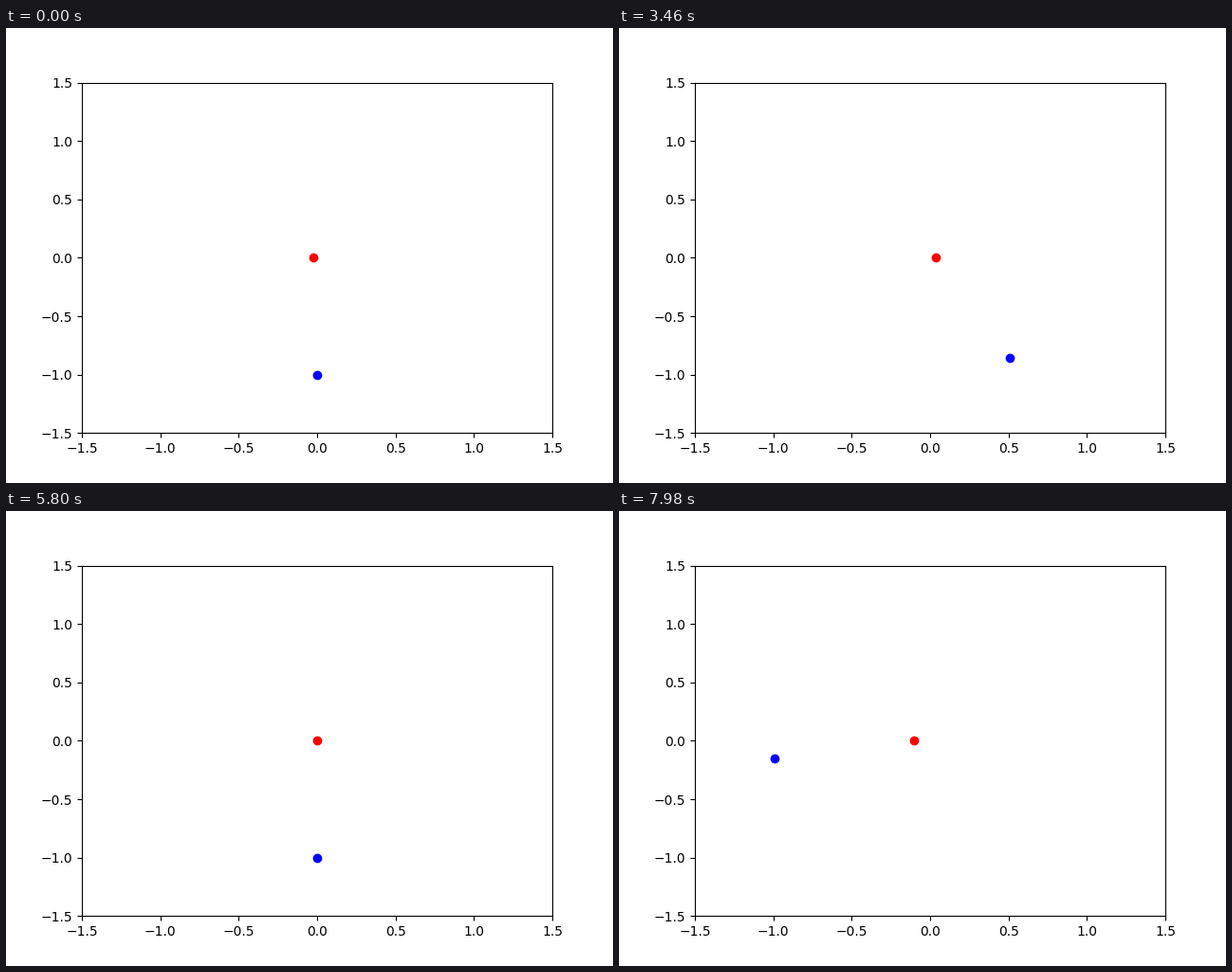
Animation of 640 by 480 pixels, one loop 8000 ms. Source, as a matplotlib script:

```python
import numpy as np
import matplotlib.pyplot as plt
from matplotlib.animation import FuncAnimation

FRAMES = 400
STEP_MS = 20
GRAVITY = 4.0
PX = 3 / 496  # data units per pixel


def hermite(t, ts, ys, slopes):
    """Cubic curve through the knots with the given slopes."""
    i = np.clip(np.searchsorted(ts, t, side="right") - 1, 0, len(ts) - 2)
    h = ts[i + 1] - ts[i]
    s = np.clip((t - ts[i]) / h, 0, 1)
    return (ys[i] * (1 + 2 * s) * (1 - s) ** 2 + slopes[i] * h * s * (1 - s) ** 2
            + ys[i + 1] * s * s * (3 - 2 * s) + slopes[i + 1] * h * s * s * (s - 1))


def eased_slopes(ts, ys):
    """Harmonic mean of both sides; flat at turning points."""
    d = np.diff(ys) / np.diff(ts)
    a, b = d[:-1], d[1:]
    same = a * b > 0
    mean = np.where(same, 2 * a * b / np.where(same, a + b, 1), 0)
    return np.concatenate(([d[0]], mean, [d[-1]]))


def pendulum_slopes(angles):
    """Speed of a free pendulum from its energy; it starts at rest."""
    reach = np.where(angles >= 0, angles.max(), angles.min())
    speed = np.sqrt(2 * GRAVITY * (np.cos(angles) - np.cos(reach)))
    speed[0] = 0
    return np.sign(np.gradient(angles)) * speed


# The red dot slides from point to point: seconds, pixels from the centre.
slide_t, slide_x = np.array([
    (0, -4), (0.54, 6), (1.48, 19), (1.8, 36), (2.3, 100), (2.9, 228),
    (3.5, 3), (4.22, 41), (4.9, -45), (5.8, 0), (6.56, -25.6),
    (7.22, -15), (7.6, 70), (7.98, -17),
]).T
# The blue dot swings on a unit circle: seconds, degrees from the bottom.
swing_t, swing_deg = np.array([
    (3.12, 0), (3.46, 30.7), (3.94, 109.6), (4.61, 143.8), (5.58, 47.9),
    (5.8, 0), (6.56, -120.9), (7.1, -141.5), (7.98, -81.5),
]).T

time = np.arange(FRAMES) * STEP_MS / 1000
red_x = PX * hermite(time, slide_t, slide_x, eased_slopes(slide_t, slide_x))
swing = np.radians(swing_deg)
angle = hermite(time, swing_t, swing, pendulum_slopes(swing))

fig, ax = plt.subplots(figsize=(6.4, 4.8), dpi=100)
ax.set_xlim(-1.5, 1.5)
ax.set_ylim(-1.5, 1.5)
red, = ax.plot([], [], "ro")
blue, = ax.plot([], [], "bo")


def draw(k):
    red.set_data([red_x[k]], [0])
    blue.set_data([np.sin(angle[k])], [-np.cos(angle[k])])
    return red, blue


anim = FuncAnimation(fig, draw, frames=FRAMES, interval=STEP_MS,
                     init_func=lambda: draw(0), repeat=True, repeat_delay=0)
plt.show()
```
